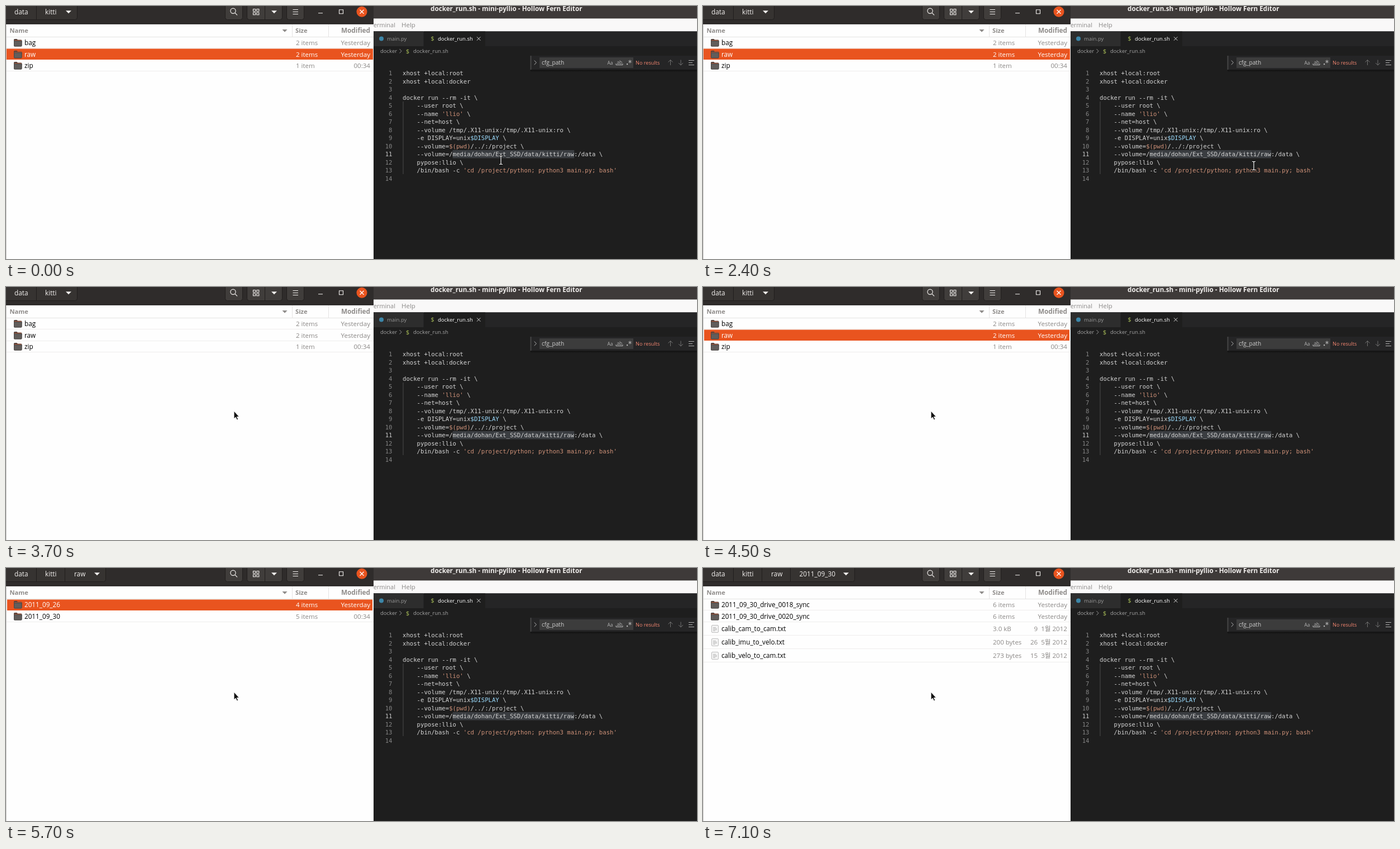
Write an HTML page that moves like this. It is 1237 px wide and 453 px high and loops after 8 s.

```html
<!DOCTYPE html>
<html lang="en">
<head>
<meta charset="utf-8">
<title>Browsing a data folder</title>
<style>
html, body { margin: 0; width: 100%; height: 100%; overflow: hidden; background: #1e1e1e; }
svg { display: block; width: 1237px; height: 453px; }
text { font-family: "Open Sans", "Noto Sans CJK KR", "Noto Sans CJK", sans-serif; font-size: 11.8px; }
.b { font-weight: 700; }
.name { font-weight: 500; font-size: 11.7px; }
.ui { font-size: 9.5px; }
.code text { font-family: "DejaVu Sans Mono", monospace; font-size: 10.63px; fill: #d4d4d4; }
.code .num { fill: #858585; }
.code .now { fill: #c6c6c6; }
.str { fill: #ce9178; }
.var { fill: #9cdcfe; }
</style>
</head>
<body>
<svg viewBox="0 0 1237 453" xmlns="http://www.w3.org/2000/svg">
  <defs>
    <linearGradient id="shade" x2="0" y2="1"><stop stop-color="#000" stop-opacity=".4"/><stop offset="1" stop-color="#000" stop-opacity="0"/></linearGradient>
    <clipPath id="right"><rect x="658" width="579" height="453"/></clipPath>
    <g id="folder">
      <path d="M1.5 0h4l1.500 1.500h6q1.500 0 1.500 1.500v3H0V1.500Q0 0 1.500 0z" fill="#4c3f3b"/>
      <path d="M1 2.500h12.500" stroke="#b85c3c"/>
      <rect y="3" width="14.500" height="10.500" rx="1.500" fill="#615d5b"/>
      <rect x=".5" y="3.500" width="13.500" height="9.500" rx="1.200" fill="none" stroke="#484442"/>
    </g>
    <g id="page">
      <rect x=".5" y=".5" width="12" height="13" rx="1.500" fill="#f5f5f5" stroke="#bdbdbd"/>
      <path d="M3 4.500h5M3 6.500h7M3 8.500h7M3 10.500h4" stroke="#b0b0b0" stroke-width=".9"/>
    </g>
  </defs>

  <g clip-path="url(#right)">
    <rect x="658" width="579" height="453" fill="#1e1e1e"/>
    <rect x="658" width="579" height="23" fill="#3e3a39"/>
    <text x="760" y="9" class="b" style="font-size:11.7px" fill="#f2f0ee">docker_run.sh - mini-pyllio - Hollow Fern Editor</text>
    <rect x="658" y="22.400" width="579" height="23.100" fill="#f9f8f8"/>
    <g fill="#8c8a89"><text x="697" y="38" text-anchor="end" style="font-size:11px">Terminal</text><text x="708" y="38" style="font-size:11.500px">Help</text></g>

    <rect x="658" y="45.500" width="579" height="26.500" fill="#252526"/>
    <rect x="658" y="45.500" width="89" height="26.500" fill="#2d2d2d"/>
    <rect x="748" y="45.500" width="110" height="26.500" fill="#1e1e1e"/>
    <circle cx="672" cy="58.500" r="4" fill="#3c86a8"/>
    <text x="682" y="62" class="ui" fill="#969696">main.py</text>
    <text x="773" y="62" class="ui" fill="#fff">docker_run.sh</text>
    <path d="M843 55.300l6.400 6.400m0-6.400l-6.400 6.400" stroke="#d8d8d8"/>
    <g fill="#8e9f4d" style="font-weight:600"><text x="760.500" y="62.300" style="font-size:10.500px">$</text><text x="716" y="84.800" style="font-size:10.500px">$</text></g>
    <g fill="#a3a3a3"><text x="670" y="84" class="ui">docker</text><text x="729" y="84" class="ui">docker_run.sh</text></g>
    <path d="M704.500 77l3.500 3.700l-3.500 3.700" fill="none" stroke="#9a9a9a"/>

    <g id="code" class="code">
      <rect x="799.600" y="258" width="217.600" height="14.500" fill="#3a3d41"/>
      <path d="M711 171v130" stroke="#4a4a4a"/>
    </g>

    <rect x="939" y="114" width="298" height="5" fill="url(#shade)"/>
    <rect x="939" y="89" width="298" height="25" fill="#252526"/>
    <rect x="938.500" y="89" width="2" height="25" fill="#454545"/>
    <rect x="955" y="92" width="168" height="19" fill="#3c3c3c"/>
    <path d="M945.700 97.500l3.800 3.800l-3.800 3.800" fill="none" stroke="#b5b5b5"/>
    <text x="959" y="104.700" style="font-size:10.200px" fill="#cccccc">cfg_path</text>
    <g fill="#b5b5b5">
      <text x="1076.500" y="104.500" style="font-size:8.300px">Aa</text>
      <text x="1093.500" y="103.800" style="font-size:8.300px">ab</text>
      <rect x="1111" y="103" width="2.200" height="2.200"/>
    </g>
    <path d="M1092 103v2.500h12v-2.500M1117 96.500v6M1114.400 98l5.200 3m0-3l-5.200 3" fill="none" stroke="#b5b5b5"/>
    <text x="1127" y="104.700" style="font-size:9.150px" fill="#f48771">No results</text>
    <path d="M1189.500 106v-9.500m-4 4l4-4l4 4M1208 96.500v9.500m-4-4l4 4l4-4" fill="none" stroke="#717171"/>
    <path d="M1222 97.500h10M1222 101.500h7M1222 105.500h10" stroke="#b0b0b0"/>
  </g>

  <rect width="658" height="453" fill="#fefefe"/>
  <rect width="658" height="32.500" fill="#2f2c2b"/>
  <rect y="31" width="658" height="1.500" fill="#211e1d"/>
  <g id="path"></g>
  <g fill="#403d3b" stroke="#211e1d">
    <rect x="392.500" y="-8" width="31" height="32.500" rx="4"/>
    <rect x="431.500" y="-8" width="63" height="32.500" rx="4"/>
    <rect x="502.500" y="-8" width="31" height="32.500" rx="4"/>
    <path d="M463.500 0v24"/>
  </g>
  <g fill="none" stroke="#f3f1ef" stroke-width="1.200">
    <circle cx="406.500" cy="8.800" r="4.600"/><path d="M410 12.300l4 4"/>
    <path d="M442.500 5.500h4v4h-4zM448.800 5.500h4v4h-4zM442.500 11.700h4v4h-4zM448.800 11.700h4v4h-4z" stroke-width="1.100"/>
    <path d="M513.500 6.500h9.500M513.500 10.500h9.500M513.500 14.500h9.500"/>
    <path d="M559 12.700h8M596.500 6.700h7v7h-7z" stroke-width="1.100"/>
  </g>
  <path d="M475 8.300h10l-5 5z" fill="#f3f1ef"/>
  <circle cx="637" cy="10.300" r="9.500" fill="#e9541f"/>
  <path d="M633.500 6.800l7 7m0-7l-7 7" stroke="#fff" stroke-width="1.300"/>

  <g fill="#8f8c8a">
    <text x="6.500" y="48" class="b" style="font-size:11.200px">Name</text>
    <text x="518" y="48" class="b" style="font-size:11.200px">Size</text>
    <text x="652" y="48" class="b" text-anchor="end">Modified</text>
    <path d="M494.500 42h9l-4.500 4.700z"/>
  </g>
  <path d="M512.500 33v22M577.500 33v22M0 55.500h658" stroke="#e4e3e2"/>
  <g id="list"></g>
  <path d="M.5 33v420" stroke="#d0cecc"/>
  <g id="mouse"></g>
</svg>

<script>
const $ = id => document.getElementById(id);
const str = s => `<tspan class="str">${s}</tspan>`;

// Shell script: [indent in characters, text]
const lines = [
  [0, 'xhost +local:root'], [0, 'xhost +local:docker'], [0, ''],
  [0, 'docker run --rm -it \\'],
  [4, '--user root \\'],
  [4, `--name ${str("'llio'")} \\`],
  [4, '--net=host \\'],
  [4, '--volume /tmp/.X11-unix:/tmp/.X11-unix:ro \\'],
  [4, '-e DISPLAY=unix<tspan class="var">$DISPLAY</tspan> \\'],
  [4, `--volume=${str('$(pwd)')}/../:/project \\`],
  [4, '--volume=/media/dohan/Ext_SSD/data/kitti/raw:/data \\'],
  [4, 'pypose:llio \\'],
  [4, `/bin/bash -c ${str("'cd /project/python; python3 main.py; bash'")}`],
  [0, '']
];
$('code').innerHTML += lines.map(([indent, s], i) => {
  const y = 124.3 + i * 14.5;
  return `<text class="num${i === 10 ? ' now' : ''}" x="691.5" y="${y}" text-anchor="end">${i + 1}</text>` +
    `<text x="${710 + indent * 6.4}" y="${y}">${s}</text>`;
}).join('');

// Folder contents: [name, size, modified]
const kitti = [['bag', '2 items', 'Yesterday'], ['raw', '2 items', 'Yesterday'], ['zip', '1 item', '00:34']];
const raw = [['2011_09_26', '4 items', 'Yesterday'], ['2011_09_30', '5 items', '00:34']];
const day = [
  ['2011_09_30_drive_0018_sync', '6 items', 'Yesterday'],
  ['2011_09_30_drive_0020_sync', '6 items', 'Yesterday'],
  ['calib_cam_to_cam.txt', '3.0 kB', '9\u00a0 1월 2012'],
  ['calib_imu_to_velo.txt', '200 bytes', '26\u00a0 5월 2012'],
  ['calib_velo_to_cam.txt', '273 bytes', '15\u00a0 3월 2012']
];

// Browser states: start, path depth, rows (null while loading), selected row, selection inset
const states = [
  [0, 2, kitti, 1, 1], [3700, 2, kitti, -1], [4500, 2, kitti, 1, 2],
  [5000, 3, null], [5100, 3, raw, -1], [5700, 3, raw, 0, 2], [6600, 3, raw, 1, 2],
  [6900, 4, null], [7100, 4, day, -1]
];
const crumbs = [['data', 15, 55], ['kitti', 70, 106], ['raw', 122, 157], ['2011_09_30', 172.5, 250]];

function drawPath(depth) {
  const shown = crumbs.slice(0, depth);
  const end = shown[depth - 1][2] + 21;
  let out = `<rect x="-8" y="-8" width="${end + 8.5}" height="32.5" rx="4" fill="#363331" stroke="#211e1d"/>`;
  shown.forEach(([name, x, edge], i) => {
    out += `<text x="${x}" y="14.7" fill="#f3f1ef">${name}</text>`;
    if (i < depth - 1) out += `<path d="M${edge - .5} 0v24" stroke="#211e1d"/>`;
  });
  $('path').innerHTML = out + `<path d="M${end - 20} 8.3h10l-5 5z" fill="#f3f1ef"/>`;
}

function drawList(rows, selected, inset) {
  if (!rows) {
    $('list').innerHTML = '<rect x="2" y="57" width="655" height="410" fill="none" stroke="#efb8a2" stroke-width="2"/>';
    return;
  }
  let y = 56;
  $('list').innerHTML = rows.map(([name, size, date], i) => {
    const file = name.endsWith('.txt');
    const h = file ? 24 : 20.4;
    const mid = y + h / 2;
    const on = i === selected;
    const faint = on ? '#fff' : '#8a8785';
    const bg = on
      ? `<rect x="${inset}" y="${Math.round(y) + .5}" width="${658 - 2 * inset}" height="19.5" fill="#e9541f"/>`
      : `<path d="M1 ${Math.round(y + h) - .5}h657" stroke="#eeedec"/>`;
    y += h;
    return bg +
      `<use href="#${file ? 'page' : 'folder'}" x="${file ? 15 : 14}" y="${Math.round(mid - 7)}"/>` +
      `<text class="name" x="33" y="${mid + 4.2}" fill="${on ? '#fff' : '#000'}">${name}</text>` +
      `<text x="519" y="${mid + 4.2}" fill="${faint}" style="font-size:11.5px">${size}</text>` +
      `<text x="652" y="${mid + 4.2}" fill="${faint}" text-anchor="end" style="font-size:11.6px">${date}</text>`;
  }).join('');
}

// Pointer track: time, x, y
const track = [
  [100, 886, 276], [400, 850, 269.5], [600, 850, 269.5], [700, 861, 269.5], [800, 861, 269.5],
  [900, 849, 265], [1000, 849, 265], [1100, 891, 257], [1300, 950, 255], [1600, 1005, 268],
  [1800, 1026, 287], [1900, 1030, 282], [2000, 1029, 284], [2200, 1008, 294], [2400, 986, 286],
  [2500, 968, 264], [2600, 981, 242], [2700, 1006, 238], [2800, 1025, 262],
  [2900, 880, 287], [3000, 650, 270], [3100, 470, 236], [3200, 408, 222]
];

function pointer(t) {
  const n = track.findIndex(p => p[0] > t);
  if (n === 0) return track[0].slice(1);
  if (n < 0) return track[track.length - 1].slice(1);
  const [t0, x0, y0] = track[n - 1], [t1, x1, y1] = track[n];
  const k = (t - t0) / (t1 - t0);
  return [x0 + (x1 - x0) * k, y0 + (y1 - y0) * k];
}

const beam = 'M-3 -7.500h2l1 1l1 -1h2M0 -6.500v13M-3 7.500h2l1 -1l1 1h2';
const arrow = 'M0 0V14L3.200 11.200L5.400 16L7.700 15L5.500 10.400H9.600z';

function drawMouse(t, busy) {
  const [x, y] = pointer(t);
  let shape;
  if (busy) {
    const turn = t / 100 * 30;
    shape = `<path d="${arrow}" transform="translate(-1 -1) scale(.78)" fill="#111" stroke="#fff" stroke-width=".9"/>
      <circle cx="5" cy="13.500" r="4.500" fill="#fff" stroke="#b9c9cf" stroke-width=".6"/>
      <circle cx="5" cy="13.500" r="3.800" fill="none" stroke="#53a5bf" stroke-width="1.700"
        stroke-dasharray="3 3" transform="rotate(${turn} 5 13.500)"/>`;
  } else if (x < 658) {
    shape = `<path d="${arrow}" fill="#111" stroke="#fff"/>`;
  } else {
    shape = `<g fill="none"><path d="${beam}" stroke="#111" stroke-width="2.800"/><path d="${beam}" stroke="#fff" stroke-width="1.200"/></g>`;
  }
  $('mouse').innerHTML = `<g transform="translate(${x} ${y})">${shape}</g>`;
}

let last = -1;
function draw(now) {
  const t = Math.floor(now % 8000 / 100) * 100; // the screen refreshes ten times a second
  if (t !== last) {
    last = t;
    const [, depth, rows, selected, inset] = states.filter(s => s[0] <= t).pop();
    drawPath(depth);
    drawList(rows, selected, inset);
    drawMouse(t, !rows);
  }
}

const start = performance.now();
function tick() {
  draw(performance.now() - start);
  requestAnimationFrame(tick);
}
tick();
</script>
</body>
</html>
```
